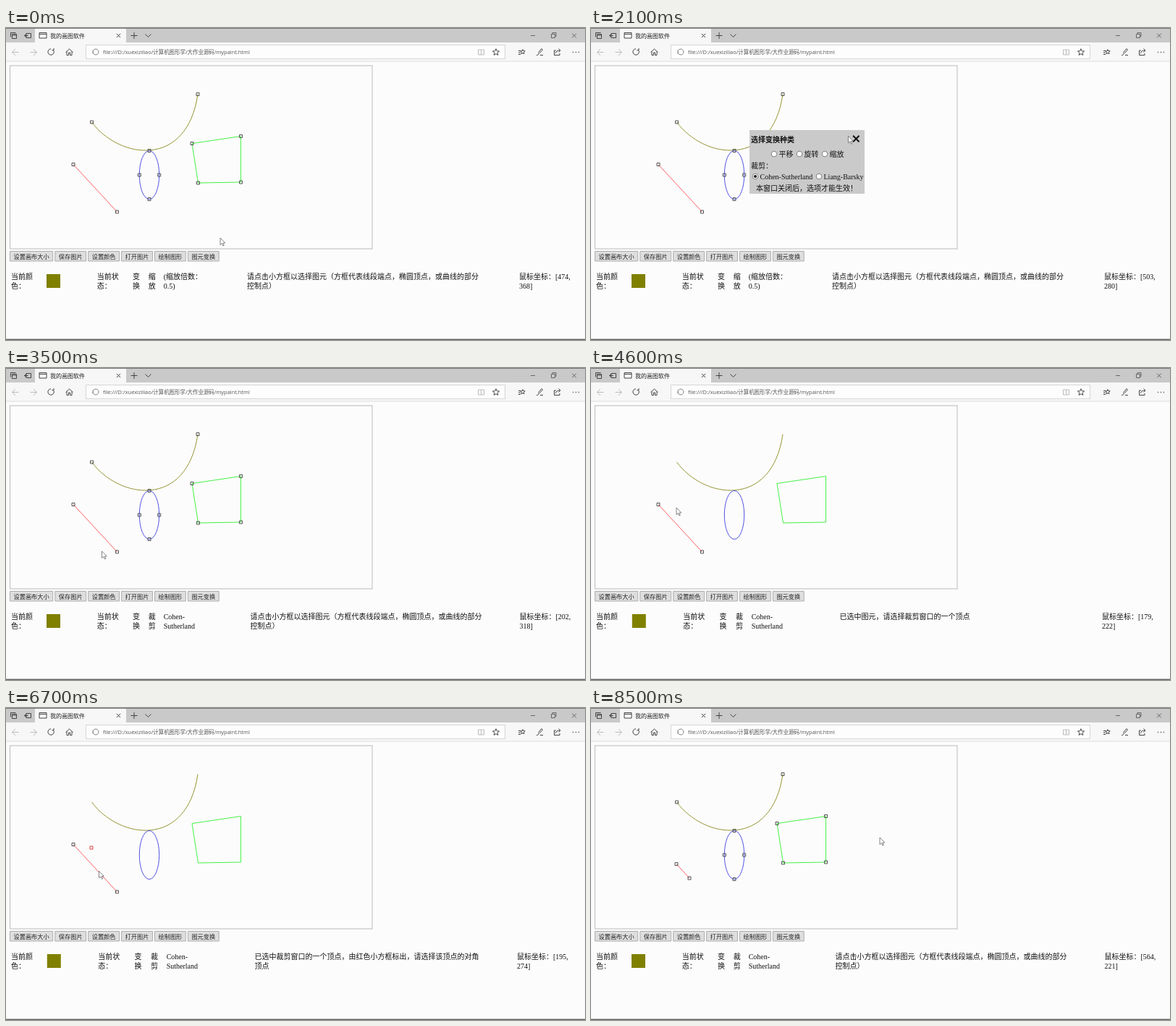
Recreate the animation shown at these times as an HTML page. Size 800 px wide and 431 px high, loop 8600 ms.

```html
<!DOCTYPE html>
<html lang="zh-CN">
<head>
<meta charset="utf-8">
<title>我的画图软件</title>
<style>
html, body { margin: 0; width: 100%; height: 100%; overflow: hidden; background: #fcfcfc; }
svg { display: block; width: 100%; height: 100%; }
text { white-space: pre; }
.ui { font: 8px "Open Sans", "Noto Sans CJK SC", sans-serif; fill: #222; }
.page { font: 10px "Liberation Serif", "Noto Sans CJK SC", serif; fill: #111; }
#icons { fill: none; stroke: #444; }
.shape { fill: none; stroke-width: .9; }
.handle { fill: none; stroke: #444; stroke-width: .9; }
.radio { fill: #fff; stroke: #666; stroke-width: .8; }
</style>
</head>
<body>
<svg viewBox="0 0 800 431">
  <rect width="800" height="431" fill="#fcfcfc"/>

  <!-- Browser window -->
  <rect width="800" height="20" fill="#c9c9c9"/>
  <rect width="800" height="1" fill="#777"/>
  <rect x="40" y="1" width="126" height="20" fill="#f7f7f7"/>
  <rect y="20" width="800" height="26" fill="#f7f7f7"/>
  <path d="M0 46H800M130.500 27V40" stroke="#ddd"/>
  <rect x="110.500" y="23.500" width="579" height="19" fill="#fdfdfd" stroke="#d6d6d6"/>
  <rect y="429.500" width="800" height="1.500" fill="#666"/>
  <g id="icons"></g>
  <g class="ui">
    <text x="61" y="13.500">我的画图软件</text>
    <text x="134" y="35.500" style="font-size:7.430px;fill:#555">file:///D:/xuexiziliao/计算机图形学/大作业源码/mypaint.html</text>
  </g>

  <!-- Drawing area -->
  <rect x="5.500" y="52" width="500.500" height="253" fill="none" stroke="#bbb"/>
  <g id="shapes"></g>
  <g id="handles"></g>
  <path class="shape" stroke="#ff5050" id="line"/>
  <g id="lineHandles"></g>
  <g id="corner"></g>
  <g id="buttons" class="ui"></g>
  <rect id="swatch" y="340" width="19" height="19" fill="#808000"/>
  <g id="status" class="page"></g>
  <g id="dialog" class="page"></g>

  <g id="cursor">
    <path id="arrow" d="M0 0V9.500L2.300 7.500L3.900 11L5.300 10.300L3.800 7H6.800Z" fill="#fff" stroke="#666" stroke-width=".8"/>
    <path id="beam" d="M-2 -4.500h4m-2 0v9m-2 0h4" fill="none" stroke="#111"/>
  </g>
</svg>
<script>
const LOOP = 8600, STEP = 100;
const DIALOG_OPEN = 500, PICK_CLIP = 1500, DIALOG_CLOSE = 2600;
const SELECT_LINE = 3900, PICK_CORNER = 5500, CLIP = 7600;
const $ = id => document.getElementById(id);
const show = (id, on) => $(id).setAttribute('visibility', on ? 'visible' : 'hidden');
const text = (x, y, content, extra = '') => `<text x="${x}" y="${y}" ${extra}>${content}</text>`;
const path = (d, extra = '') => `<path d="${d}" ${extra}/>`;

// Icon outlines
const box = (x, y, w, h = w) => `M${x} ${y}h${w}v${h}h${-w}z`;
const cross = (x, y, r) => `M${x - r} ${y - r}l${2 * r} ${2 * r}m0 ${-2 * r}l${-2 * r} ${2 * r}`;
const plus = (x, y, r) => `M${x - r} ${y}h${2 * r}M${x} ${y - r}v${2 * r}`;
const arrow = (x, y, r, dir) => `M${x - dir * r} ${y}h${dir * 2 * r}l${-dir * r} ${-r}m${dir * r} ${r}l${-dir * r} ${r}`;
const circle = (x, y, r) => `M${x - r} ${y}a${r} ${r} 0 1 1 0 .01`;
const star = (x, y, r) => 'M' + Array.from({ length: 10 }, (_, i) => {
  const a = i * Math.PI / 5, d = i % 2 ? r * .45 : r;
  return [x + d * Math.sin(a), y - d * Math.cos(a)].map(v => v.toFixed(1));
}).join('L') + 'Z';

$('icons').innerHTML =
  path(box(8.5, 8.5, 6) + 'M6.5 12.5v-6h7M8.5 10h6' + box(28, 7.5, 6.5, 6) + arrow(28, 10.5, 2.5, -1)) +
  path(box(46, 6.5, 10, 7.5) + 'M46 8.5h10' + cross(155.5, 10.5, 2.6) + plus(177, 10.5, 4.5) + 'M192.5 8.5l4 4l4 -4') +
  path('M725 10.5h6' + box(753.5, 8.5, 5) + 'M755 8v-1.5h5v5h-1' + cross(785, 10.5, 2.8), 'stroke="#666"') +
  path(arrow(13, 33.5, 4.5, -1) + arrow(38, 33.5, 4.5, 1) + box(652.5, 30, 4, 7) + box(656.5, 30, 4, 7), 'stroke="#bbb"') +
  path('M65.5 30.5a4.2 4.2 0 1 1 -3.5 -1.7M66 28v2.6h-2.6' + 'M82.500 33.500l5 -4.500l5 4.500M84 32.500v5h2.500v-3.500h2v3.500h2.500v-5') +
  path(circle(124, 33, 4) + 'M120 32.5v3M120 30.5v1', 'stroke="#888"') +
  path(star(677, 33.5, 4.8) + star(714, 33, 3.4) + 'M708 31.500h3M708 34h3M708 36.500h3') +
  path('M733 37.5q4 0 3 -4l4 -5l1.500 1.500l-4 4.500M738 37.5h4' + 'M760 31h-2.500v6.500h7.500v-2.500M759.5 35q0 -4 6.500 -4l-2.500 -2.500m2.500 2.500l-2.500 2.500') +
  path('M783 33.5h1m3 0h1m3 0h1', 'stroke-width="1.5"');

// Drawn shapes; their handles follow from the same points.
const curveEnds = [[118.5, 130], [265, 91.5]];
const oval = { x: 198, y: 203, rx: 13.7, ry: 33.5 };
const quad = [[257, 159.5], [324.5, 149.5], [324.5, 213], [265.5, 214]];
const fullLine = [[93, 188.5], [153.5, 254]];
const corner = [118, 193], opposite = [136, 248.4];

const pointOnLine = x => {
  const [[x0, y0], [x1, y1]] = fullLine;
  return [x, y0 + (x - x0) * (y1 - y0) / (x1 - x0)];
};
const clippedLine = [corner, opposite].map(([x]) => pointOnLine(x));
const ovalTips = [0, 1, 2, 3].map(i => {
  const a = i * Math.PI / 2;
  return [oval.x + oval.rx * Math.cos(a), oval.y + oval.ry * Math.sin(a)];
});
const handle = ([x, y], color = '#444') => path(box(x - 2, y - 2, 4), `class="handle" style="stroke:${color}"`);

$('shapes').innerHTML =
  path(`M${curveEnds[0]}C156 181 250 195 ${curveEnds[1]}`, 'class="shape" stroke="#8a8a20"') +
  `<ellipse class="shape" stroke="#4040e0" cx="${oval.x}" cy="${oval.y}" rx="${oval.rx}" ry="${oval.ry}"/>` +
  path(`M${quad.join('L')}Z`, 'class="shape" stroke="#30f030"');
$('handles').innerHTML = [...curveEnds, ...ovalTips, ...quad].map(p => handle(p)).join('');
$('corner').innerHTML = handle(corner, '#d33');

// Each button is as wide as its label plus padding.
const FONT = 8.2;
let left = 5.5;
for (const label of ['设置画布大小', '保存图片', '设置颜色', '打开图片', '绘制图形', '图元变换']) {
  const width = label.length * FONT + 10;
  $('buttons').innerHTML += path(box(left, 308.5, width, 13.5), 'fill="#dedede" stroke="#adadad"') +
    text(left + width / 2, 318.7, label, `text-anchor="middle" font-size="${FONT}"`);
  left += width + 3.1;
}

const radio = (x, y, label) => `<circle class="radio" cx="${x}" cy="${y}" r="3.8"/>` + text(x + 6.5, y + 4, label);
const scaleRadio = [323, 174], clipRadio = [227, 205];
const inDialog = ([x, y]) => x >= 219 && x <= 378 && y >= 141 && y <= 229;
$('dialog').innerHTML = path(box(219, 141, 159, 88), 'fill="#cacaca"') +
  text(221, 158, '选择变换种类', 'font-weight="bold"') +
  path(cross(366.3, 153, 4.2), 'stroke="#111" stroke-width="2"') +
  ['平移', '旋转', '缩放'].map((label, i) => radio(253 + 35 * i, 174, label)).join('') +
  text(221, 194, '裁剪：') +
  ['Cohen-Sutherland', 'Liang-Barsky'].map((label, i) => radio(227 + 88 * i, 205, label)).join('') +
  text(228, 225, '本窗口关闭后，选项才能生效！') +
  '<circle id="dot" r="2.1" fill="#222"/>';

// Status row: the columns spread a little when the hint gets shorter.
const selectHint = '请点击小方框以选择图元（方框代表线段端点，椭圆顶点，或曲线的部分|控制点）';
const modes = {
  scale: { spread: 0, hintX: 333, mouseX: 709, kind: '缩|放', detail: '(缩放倍数：|0.5)', hint: selectHint },
  clip: { spread: 0, hintX: 337.5, mouseX: 709.5, hint: selectHint },
  selected: { spread: .8, hintX: 343.5, mouseX: 706, hint: '已选中图元，请选择裁剪窗口的一个顶点' },
  corner: { spread: .8, hintX: 343.5, mouseX: 706,
    hint: '已选中裁剪窗口的一个顶点，由红色小方框标出，请选择该顶点的对角|顶点' }
};
const cell = (x, content) => content.split('|').map((line, i) => text(x, 347 + 13 * i, line)).join('');

function drawStatus(mode, [mouseX, mouseY]) {
  const { spread, kind = '裁|剪', detail = 'Cohen-|Sutherland' } = mode;
  const column = (x, i) => x + spread * i;
  $('swatch').setAttribute('x', column(56, 1));
  $('status').innerHTML = cell(7, '当前颜|色：') +
    cell(column(125.7, 2), '当前状|态：') + cell(column(175, 3), '变|换') +
    cell(column(196.7, 4), kind) + cell(column(217.7, 5), detail) +
    cell(mode.hintX, mode.hint) + cell(mode.mouseX, `鼠标坐标：[${mouseX},|${mouseY}]`);
}

// Pointer stops: place, arrival, departure
const stops = [
  [[296, 290], 0, 100],
  [[274, 314], 400, 600],
  [[320, 229], 800, 800],
  [[265, 222], 1000, 1000],
  [clipRadio, 1400, PICK_CLIP],
  [[363, 146], 2200, DIALOG_CLOSE],
  [[132.5, 253], 3500, 3500],
  [fullLine[1], 3800, SELECT_LINE],
  [corner, 4200, 6200],
  [opposite, 7100, 8400],
  [[399, 179], 8500, LOOP]
];

function cursorAt(t) {
  const i = stops.findIndex(([, , leave]) => t <= leave);
  const [to, arrive] = stops[i];
  if (t >= arrive) return to;
  const [from, , leave] = stops[i - 1];
  const p = (t - leave) / (arrive - leave), ease = p * p * (3 - 2 * p);
  return from.map((v, k) => v + (to[k] - v) * ease);
}

// The readout trails the fast jump and freezes while the pointer is over the dialog.
function mouseReadout(t, [x, y]) {
  if (t <= stops[0][2]) return [474, 368];
  if (t >= 8500) return [564, 221];
  if (t >= 800 && t < DIALOG_CLOSE) return [503, 280];
  return [Math.floor((x - 6) * 1.6), Math.floor((Math.min(y, 304) - 54) * 1.6)];
}

function draw(t) {
  const cursor = cursorAt(t);
  const dialogOpen = t >= DIALOG_OPEN && t < DIALOG_CLOSE;
  const selected = t >= SELECT_LINE && t < CLIP;
  const hasCorner = t >= PICK_CORNER && t < CLIP;
  const line = t < CLIP ? fullLine : clippedLine;

  $('line').setAttribute('d', 'M' + line.join('L'));
  $('lineHandles').innerHTML = line.map(p => handle(p)).join('');
  show('handles', !selected);
  show('corner', hasCorner);

  show('dialog', dialogOpen);
  const [dotX, dotY] = t < PICK_CLIP ? scaleRadio : clipRadio;
  $('dot').setAttribute('cx', dotX);
  $('dot').setAttribute('cy', dotY);

  const mode = t < DIALOG_CLOSE ? 'scale' : hasCorner ? 'corner' : selected ? 'selected' : 'clip';
  drawStatus(modes[mode], mouseReadout(t, cursor));

  const overText = dialogOpen && inDialog(cursor) && cursor[0] > 233 && cursor[1] > 200;
  $('cursor').setAttribute('transform', `translate(${cursor})`);
  show('arrow', !overText);
  show('beam', overText);
}

const start = performance.now();
let shown = -1;
function tick() {
  const t = Math.floor((performance.now() - start) % LOOP / STEP) * STEP;
  if (t !== shown) draw(shown = t);
  requestAnimationFrame(tick);
}
tick();
</script>
</body>
</html>
```
